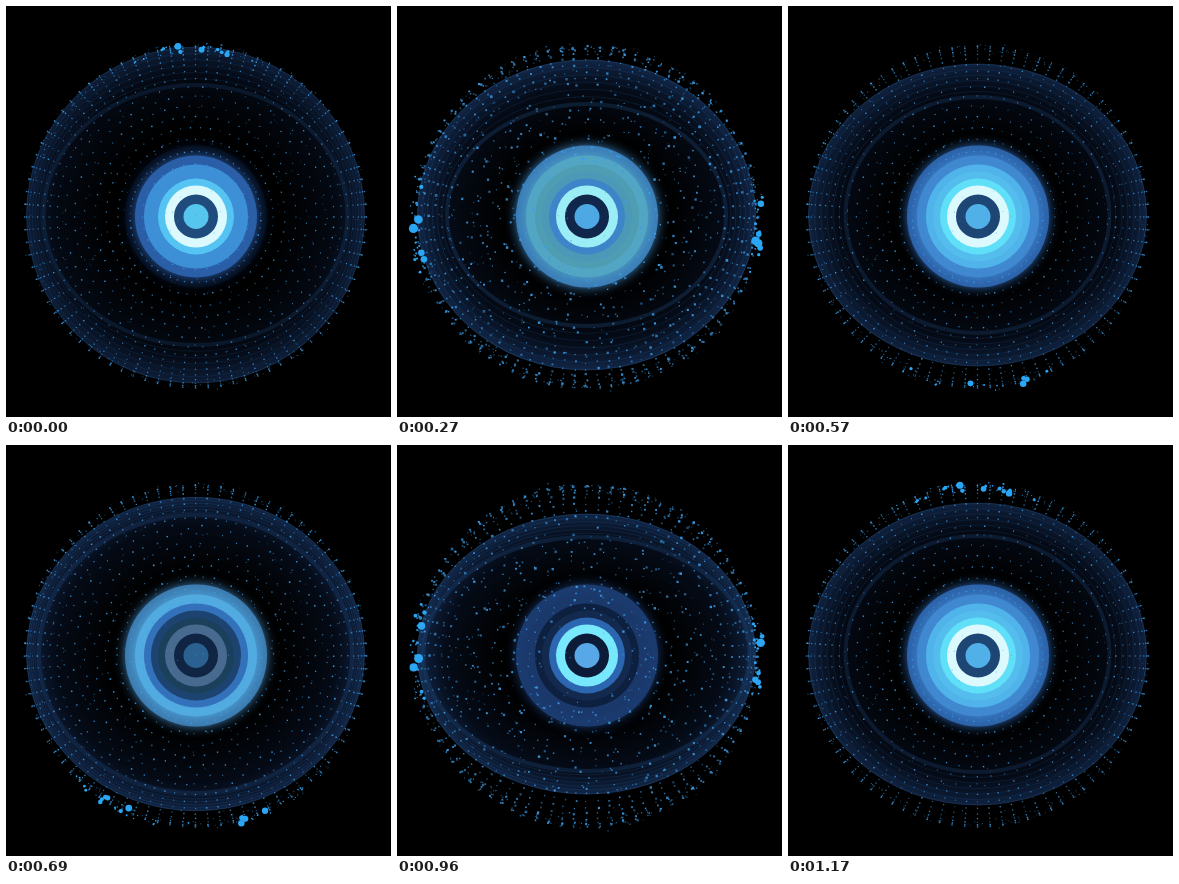
Animation, 385 px wide and 411 px high, one loop 1200 ms. Source, as an HTML page with a canvas:

```html
<!DOCTYPE html>
<html lang="en">
<head>
<meta charset="utf-8">
<title>Particle sphere</title>
<style>
  html, body { margin: 0; width: 100%; height: 100%; overflow: hidden; background: #000; }
  canvas { display: block; }
</style>
</head>
<body>
<canvas id="stage" width="385" height="411"></canvas>
<script>
const ctx = document.getElementById('stage').getContext('2d');
const TAU = Math.PI * 2, LOOP = 1200, PULSE = 600, STEP = 30;
const CX = 189.5, CY = 211, R = 171;

let seed = 7;
const rand = () => {
  seed = (seed * 16807) % 2147483647;
  return seed / 2147483647;
};

// Core discs from the outside in, with their colours over one pulse.
const discRadii = [71, 61, 52, 45, 38, 31, 22, 12.5];
const discKeys = [
  [0, '050d1c 2a5fa8 3d8fd6 3d8fd6 55c4f2 dcfafe 1f4c7c 56c6ee'],
  [120, '4f9fe0 5ec4f4 3068b0 12294e 081428 173a6a 0a1830 1c3f70'],
  [210, '50a8e8 78f0ff 78f0ff 70e4fc 489ad8 b4f2f2 142c58 48a8e0'],
  [360, '1c3c70 1a386a 0e2040 13294e 2c66b0 78e8fc 0c1c38 58a8e8'],
  [390, '3070c0 2a60b0 0a1830 0c1c38 2a5898 78e8fc 081830 60d0f4'],
  [570, '2c62a8 4088d0 50b4ea 55bcee 60e0f8 dcf9fd 1e4674 52b0e8'],
].map(([at, list]) => [at, list.split(' ').flatMap(hex =>
  [0, 2, 4].map(i => parseInt(hex.substr(i, 2), 16)))]);

// Shell: outer ry, inner rx, inner ry, opacity.
const shellKeys = [
  [0, [168, 152, 130, .8]], [120, [153, 158, 142, 1]], [210, [165, 124, 107, 1]],
  [360, [140, 163, 117, 1]], [390, [140, 160, 120, 0]], [540, [146, 135, 117, .6]],
  [570, [151, 132, 118, .9]],
];

// Angle of the bright band, measured from the top down both sides.
const bandKeys = [[0, [2]], [120, [20]], [240, [88]], [390, [128]], [570, [171]], [600, [174]]];

function sample(keys, t, period) {
  const next = keys.findIndex(k => k[0] > t);
  const [t0, a] = keys[(next < 0 ? keys.length : next) - 1];
  const [t1, b] = next < 0 ? [period, keys[0][1]] : keys[next];
  const f = (t - t0) / (t1 - t0);
  return a.map((v, i) => v + (b[i] - v) * f);
}

const dots = [];
for (let ring = 4; ring < 21; ring++) {
  const r = R * Math.sin(ring * TAU / 80);
  const count = r > 138 ? 84 : r > 65 ? 56 : 28;
  for (let i = 0; i < count; i++) {
    dots.push({
      r, a: (i + (r > 138 ? 0 : ring % 2 / 2)) / count * TAU + TAU / 4,
      drift: rand() * TAU, reach: r > 138 ? 1.2 : 4 + rand() * 9,
      size: 1 + rand() * .5, grow: rand() ** 2 * 1.3, alpha: .45 + rand() * .5,
    });
  }
}
// Dust around the rim and over the face
for (let i = 0; i < 420; i++) {
  const r = i < 200 ? 163 + rand() * 11 : R * Math.sqrt(rand());
  dots.push({ r, a: rand() * TAU, drift: rand() * TAU, reach: 3,
    size: .7 + rand() * .5, grow: rand() * .6, alpha: .2 + rand() * .5 });
}

const sparks = Array.from({ length: 230 }, (_, i) => ({
  angle: rand() * 180, side: i % 2 ? 1 : -1, r: 165 + rand() * 9, size: .9 + rand() ** 3 * 4,
}));

function disc(x, y, r, color) {
  ctx.fillStyle = color;
  ctx.beginPath();
  ctx.arc(x, y, r, 0, TAU);
  ctx.fill();
}

function ellipse(rx, ry) {
  ctx.beginPath();
  ctx.ellipse(CX, CY - 2, rx, ry, 0, 0, TAU);
}

function drawShell(t) {
  const [ry, innerX, innerY, alpha] = sample(shellKeys, t, PULSE);
  ctx.save();
  ctx.globalAlpha = alpha;
  ctx.save();
  ctx.translate(CX, CY - 2);
  ctx.scale(1, ry / 169);
  const fill = ctx.createRadialGradient(0, 0, 85, 0, 0, 169);
  fill.addColorStop(0, 'rgba(12,28,58,0)');
  fill.addColorStop(.65, 'rgba(14,32,66,.35)');
  fill.addColorStop(1, 'rgba(24,54,100,.7)');
  disc(0, 0, 169, fill);
  ctx.restore();
  ctx.lineWidth = 1;
  for (let i = 0; i < 6; i++) {
    const f = i / 6;
    ctx.strokeStyle = `rgba(50,100,165,${i ? .17 : .4})`;
    ellipse(169 + (innerX - 169) * f, ry + (innerY - ry) * f);
    ctx.stroke();
  }
  ctx.lineWidth = 4;
  ctx.strokeStyle = 'rgba(36,76,130,.3)';
  ellipse(innerX, innerY);
  ctx.stroke();
  ctx.restore();
}

function drawCore(t) {
  const c = sample(discKeys, t, PULSE);
  discRadii.forEach((r, i) => {
    const color = `rgb(${c.slice(i * 3, i * 3 + 3).map(Math.round)})`;
    ctx.shadowColor = i < 2 ? color : 'transparent';
    ctx.shadowBlur = i < 2 ? 12 : 0;
    disc(190, 210.5, r, color);
  });
  ctx.shadowBlur = 0;
}

function drawDots(t) {
  const scatter = Math.sin(Math.PI * t / PULSE) ** 2;
  ctx.fillStyle = '#3c9ee8';
  for (const d of dots) {
    const turn = d.drift + TAU * t / PULSE;
    const x = CX + d.r * Math.cos(d.a) + Math.cos(turn) * d.reach * scatter;
    const y = CY + d.r * Math.sin(d.a) + Math.sin(turn) * d.reach * scatter;
    const size = d.size + d.grow * scatter;
    ctx.globalAlpha = d.alpha;
    ctx.fillRect(x - size / 2, y - size / 2, size, size);
  }
  ctx.globalAlpha = 1;
}

function drawSparks(t) {
  const [band] = sample(bandKeys, Math.min(t, LOOP - t), LOOP);
  const lift = Math.sin(Math.PI * t / PULSE) ** 2;
  for (const s of sparks) {
    const size = s.size * Math.exp(-(((s.angle - band) / 18) ** 2)) * (.75 + .3 * lift);
    if (size < .35) continue;
    const a = s.angle * Math.PI / 180, r = s.r + 3 * lift;
    disc(CX + s.side * r * Math.sin(a), CY - r * Math.cos(a), size, '#2ba6f5');
  }
}

function frame() {
  const t = Math.floor(performance.now() % LOOP / STEP) * STEP;
  ctx.fillStyle = '#000';
  ctx.fillRect(0, 0, 385, 411);
  drawShell(t % PULSE);
  drawCore(t % PULSE);
  drawDots(t % PULSE);
  drawSparks(t);
  requestAnimationFrame(frame);
}
frame();
</script>
</body>
</html>
```
